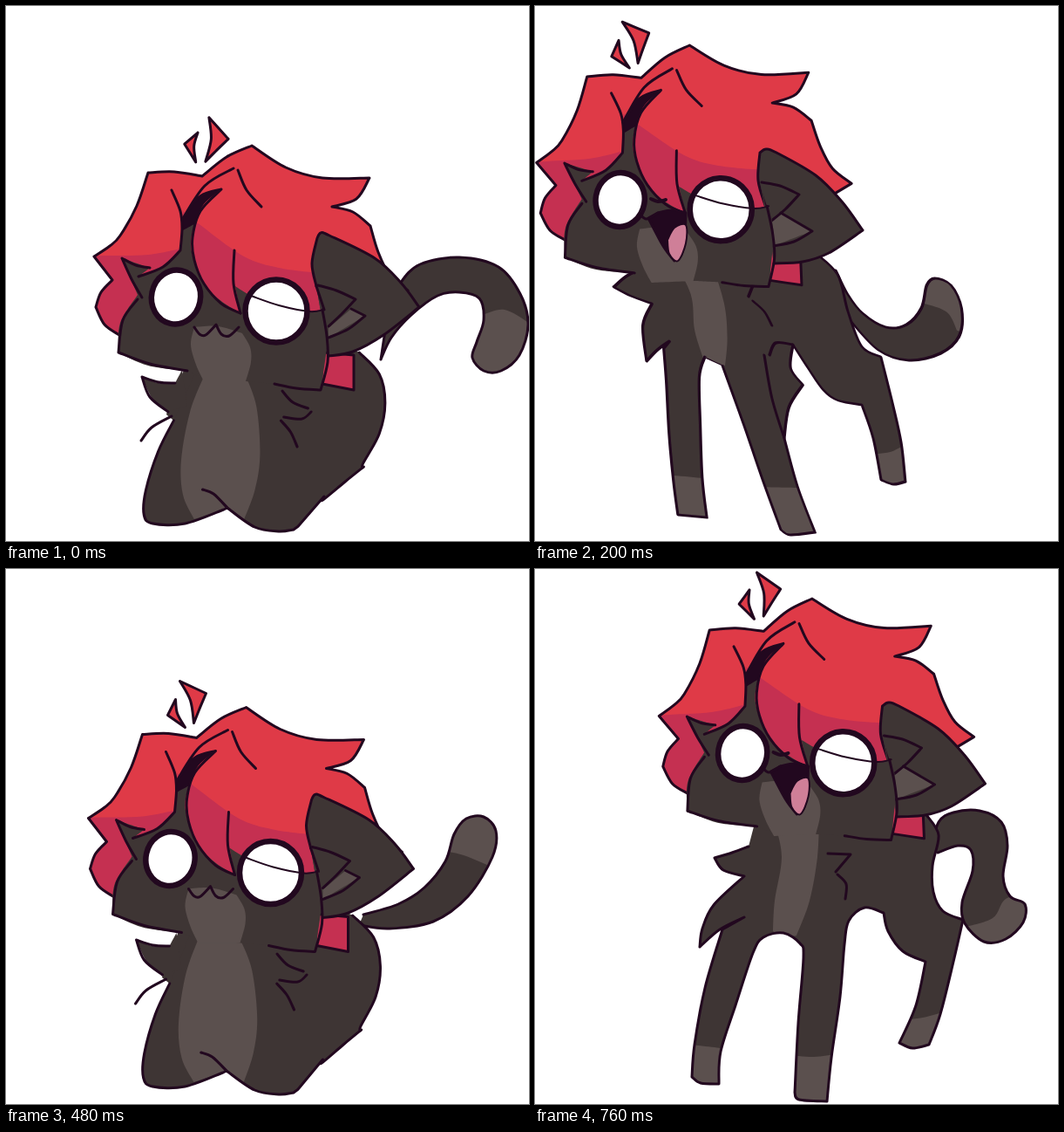
Write an HTML page that moves like this. It is 600 px wide and 613 px high and loops after 0.84 s.

```html
<!DOCTYPE html>
<html lang="en">
<head>
<meta charset="utf-8">
<title>Bouncing cat</title>
<style>
  html, body { margin: 0; width: 100%; height: 100%; overflow: hidden; background: #fff; }
  #strip { display: block; width: 6000px; height: 613px; animation: poses 840ms step-end infinite; }
  #strip path, #strip ellipse { stroke-linecap: round; stroke-linejoin: round; }
  @keyframes poses {
    0%     { transform: translateX(0); }
    9.52%  { transform: translateX(-600px); }
    19.04% { transform: translateX(-1200px); }
    23.8%  { transform: translateX(-1800px); }
    38.09% { transform: translateX(-2400px); }
    47.61% { transform: translateX(-3000px); }
    57.14% { transform: translateX(-3600px); }
    66.66% { transform: translateX(-4200px); }
    76.19% { transform: translateX(-4800px); }
    90.47% { transform: translateX(-5400px); }
    100%   { transform: translateX(-5400px); }
  }
</style>
</head>
<body>
<svg id="strip" viewBox="0 0 6000 613"></svg>
<script>
const INK = '#22081f', FUR = '#3e3534', PALE = '#5b504e',
      RED = '#df3a47', WINE = '#c53051', PINK = '#cf7f98';

// Smooth curve through points; "|" marks a corner.
function curve(text) {
  let d = '', last;
  for (const run of text.split('|')) {
    const n = run.trim().split(/\s+/).map(Number), p = last ? [last] : [];
    for (let i = 0; i < n.length; i += 2) p.push([n[i], n[i + 1]]);
    if (!last) d = `M${p[0]}`;
    for (let i = 0; i < p.length - 1; i++) {
      const a = p[i - 1] || p[i], b = p[i], c = p[i + 1], e = p[i + 2] || c;
      const h = k => [b[k] + (c[k] - a[k]) / 6, c[k] - (e[k] - b[k]) / 6];
      const [x1, x2] = h(0), [y1, y2] = h(1);
      d += `C${[x1, y1, x2, y2, ...c].map(v => +v.toFixed(1))}`;
    }
    last = p[p.length - 1];
  }
  return d;
}

const line = (pts, w = 3) =>
  `<path d="${curve(pts)}" fill="none" stroke="${INK}" stroke-width="${w}"/>`;
const fill = (pts, color) => `<path d="${curve(pts)}Z" fill="${color}"/>`;
const shape = (pts, color, w = 3) => fill(pts, color) + line(pts, w);
const group = (transform, inner) => `<g transform="${transform}">${inner}</g>`;
const use = id => `<use href="#${id}"/>`;

let clips = 0;
// Filled outline with shading kept inside it; "close" is the unstroked rest.
function shaded(pts, close, color, shades, shadeColor) {
  const id = 'c' + clips++;
  return `<clipPath id="${id}"><path d="${curve(pts + close)}Z"/></clipPath>` +
    fill(pts + close, color) +
    `<g clip-path="url(#${id})">${shades.map(s => fill(s, shadeColor)).join('')}</g>` + line(pts);
}

// Head parts
const hair = shaded(
  '117 374 100 362 90 342 | 96 325 109 311 | 88 284 | 106 272 118 260 137 226 150 188 | 180 187 212 192 |' +
  '240 170 269 157 | 308 182 350 194 404 194 | 389 218 361 227 | 385 233 405 249 | 414 279 427 305 448 323 |' +
  '424 336 | 352 345 | 300 420 | 117 374', '', RED,
  ['70 284 100 283 150 282 192 274 | 192 400 | 70 400', '190 232 210 248 260 284 300 297 346 303 | 360 380 | 190 380'], WINE)
  + shape('352 394 386 397 | 386 437 | 350 430', WINE);

const eye = (x, y, rx, ry, turn, w) =>
  `<ellipse cx="${x}" cy="${y}" rx="${rx}" ry="${ry}" transform="rotate(${turn} ${x} ${y})" fill="#fff" stroke="${INK}" stroke-width="${w}"/>`;

const face =
  fill('120 286 | 152 297 | 139 307 | 167 296 187 277 | 189 245 | 204 244 | 199 272 210 308 230 332 256 349 | 250 318 |' +
    '270 330 300 340 335 347 | 352 345 | 356 378 348 437 | 295 430 | 262 427 | 205 420 | 195 415 | 150 409 116 394 |' +
    '118 360 138 328', FUR)
  + fill('203 365 199 385 205 408 214 427 | 262 427 | 268 405 267 388 258 372 | 230 364 203 365', PALE)
  + fill('189 242 | 210 215 234 207 | 214 224 203 247 | 190 254', INK)
  + line('143 331 131 310 120 286 | 136 294 152 297')
  + line('138 333 121 357 116 394 | 152 407 195 415')
  + line('177 208 187 232 189 252 187 277 | 167 296 139 307')
  + line('295 430 320 435 348 437 | 356 405 355 375 350 345')
  + line('248 183 215 203 189 242 | 210 215 234 207 | 210 232 201 262 203 288 214 315 234 338 256 349')
  + line('249 277 248 315 256 349')
  + line('253 185 263 208 280 227')
  + eye(182, 330.5, 28, 31, 12, 6.5)
  + eye(297, 346.5, 35.5, 36, 0, 6.5)
  + line('268 329 300 340 335 347 352 345', 2);

const shards = shape('193 127 223 141 | 215 160 209 175 | 205 149 193 127', RED)
  + shape('188 148 190 164 199 180 | 179 166 | 188 148', RED);

const earLow =
  shape('343 318 338 292 344 263 | 348 257 358 260 410 286 440 314 461 342 | 420 374 385 393 357 398', FUR)
  + fill('352 345 | 343 318 | 357 398', FUR)
  + fill('383 344 | 399 352 | 357 377 | 357 366', PALE)
  + line('343 318 352 345')
  + line('345 317 366 323 388 333 | 372 350 357 364')
  + line('383 344 399 352 | 380 367 357 377');

const earHigh =
  shape('268 231 259 200 261 168 | 268 164 280 168 325 194 355 224 379 257 | 340 283 310 293 277 295', FUR)
  + fill('268 231 | 261 200 | 277 295', FUR)
  + fill('285 237 | 321 258 | 276 275 | 274 248', PALE)
  + line('263 202 284 206 306 216 | 290 233 273 247')
  + line('285 237 321 258 | 300 270 276 275');

const lips = line('203 365 209 373 216 374 228 362 | 234 373 243 375 254 365');
const smile = shape('212 372 215 385 222 394 232 397 243 393 248 374 | 236 374 228 364 | 220 373 212 372', PINK) + lips;
const shout =
  shape('133 243 144 237 | 160 234 176 237 | 175 262 171 285 163 292 | 150 275 133 243', INK)
  + shape('155 268 163 254 176 251 176 272 167 292 157 284 155 268', PINK, 2)
  + line('123 238 131 244 144 237')
  + line('136 221 144 224 153 222', 4);

// Tails: outline and the pale end
const tail = (pts, tip) => shaded(pts, '', FUR, [tip], PALE);
const tails = {
  farDown: tail('430 405 | 440 345 452 318 475 296 520 288 565 299 590 330 599 365 589 400 568 418 548 418 535 403 540 385 548 360 543 335 520 328 495 332 465 354 442 380 430 405',
    '525 362 546 354 572 348 600 363 | 600 430 | 520 430'),
  nearDown: tail('420 412 | 435 345 455 315 490 302 530 310 555 336 562 368 553 400 537 424 517 430 497 415 500 394 512 376 508 358 490 353 465 362 440 386 424 412',
    '490 375 512 365 535 358 565 360 | 565 440 | 485 440'),
  nearUp: tail('400 418 413 412 452 388 477 350 488 300 478 250 462 223 440 214 423 226 424 248 437 275 440 300 430 340 400 380',
    '410 280 438 287 462 290 490 284 | 490 200 | 410 200'),
  farUp: tail('405 405 430 412 470 410 505 386 524 343 528 295 519 250 500 223 476 214 455 228 452 250 467 272 483 295 483 328 470 362 450 385 410 394',
    '440 285 467 278 494 273 530 275 | 530 200 | 440 200'),
  mid: tail('405 408 440 412 490 404 530 375 558 330 562 300 548 284 528 286 514 304 504 335 480 365 450 384 410 396',
    '495 322 525 328 565 345 | 580 270 | 495 270'),
};

// Sitting
const sitBody =
  fill('183 475 | 174 468 | 192 412 | 215 370 | 340 370 | 390 397 | 420 470 | 250 570 | 170 570', FUR)
  + shaded('183 475 168 510 157 555 157 583 168 593 205 593 248 577 | 252 575 | 285 597 313 602 330 600 | 335 596 | 362 562 | 361 566 385 545 405 528 |' +
    '404 524 420 490 424 455 415 422 390 397', '| 215 390', FUR,
    ['214 424 201 465 195 520 200 560 215 588 | 248 577 | 256 580 271 592 | 282 555 285 515 277 460 262 424'], PALE)
  + line('222 554 235 559 252 575')
  + line('305 441 318 454 336 461') + line('340 465 330 473 309 471') + line('306 475 318 488 327 505');

const ruffLeft = fill('145 440 155 458 175 469 | 195 460 | 187 415 | 180 434 | 160 440 145 440', FUR)
  + line('180 434 163 440 145 440 | 155 458 175 469') + line('148 512 160 492 183 474');
const ruffRight = fill('156 425 168 450 186 465 | 208 458 | 202 417 | 194 432 | 175 432 156 425', FUR)
  + line('194 432 175 431 156 425 | 165 448 186 465') + line('155 498 167 483 190 470');

function sit({ lean, mouth, tail, tilt }) {
  const ruff = lean === 0 ? ruffLeft : group(`translate(${13 * (lean - 1)} 0)`, ruffRight);
  return tails[tail]
    + group(`matrix(1 0 ${-.075 * lean} 1 ${45 * lean} 0)`, sitBody) + ruff
    + group(`translate(${13 * lean} ${3 * lean})`,
      use('hair') + earLow + use('face') + mouth + group(`rotate(${tilt} 212 192)`, use('shards')));
}

// Standing
const stretch = tail('470 303 472 330 480 352 500 368 525 365 550 346 567 320 580 312 595 320 596 346 580 378 550 398 510 406 480 394 462 360',
    '540 338 562 343 578 352 580 372 | 620 380 | 620 290 | 550 290')
  + shaded('245 302 226 310 207 322 | 222 332 243 341 | 222 366 209 407 | 227 394 245 384 | 235 392 | 222 430 200 490 182 545 171 583 | 203 586 |' +
    '217 540 240 480 262 425 278 402 | 294 411 | 290 480 285 545 282 600 | 290 606 320 603 | 322 550 330 495 | 350 460 377 434 | 371 415 385 388 |' +
    '391 415 398 440 410 452 435 457 | 432 495 421 543 | 433 548 448 545 | 462 500 471 455 480 402 | 463 390 464 350 470 308 455 283',
    '| 380 230 | 265 270', FUR,
    ['160 537 185 538 217 541 | 210 600 | 160 600', '270 551 322 552 | 330 620 | 270 620', '415 514 445 511 470 500 | 470 560 | 410 560',
     '288 285 292 330 279 372 275 409 | 297 412 | 313 380 326 340 332 285'], PALE)
  + fill('278 402 | 294 411 | 297 411 | 297 400', PALE)
  + line('330 495 335 450 347 400') + line('353 400 366 386 385 388')
  + line('351 311 375 311 | 357 333') + line('360 338 368 350 370 366');

const landRight = tail('455 320 463 290 480 279 510 277 535 290 542 317 537 352 545 375 562 384 560 405 540 424 515 427 493 406 490 382 502 346 500 322 485 317 462 325',
    '570 370 540 378 525 400 490 411 | 490 440 | 580 440')
  + shaded('245 318 226 325 206 331 | 216 345 240 352 | 205 385 192 412 189 433 | 212 413 240 399 | 215 413 | 195 480 183 545 180 582 | 190 589 211 590 |' +
    '213 553 230 500 250 440 262 422 285 417 304 429 308 445 302 520 298 600 | 303 608 335 610 | 340 560 350 490 355 430 360 403 378 388 400 394 |' +
    '405 415 422 438 448 450 | 437 500 418 543 | 433 549 452 545 | 465 510 480 450 491 402 | 468 392 457 370 456 340 463 305 450 283',
    '| 370 240 | 255 280', FUR,
    ['170 544 213 549 | 215 600 | 170 600', '290 557 320 559 345 556 | 345 620 | 290 620', '415 517 445 514 470 507 | 470 560 | 410 560',
     '275 290 283 330 275 380 273 415 | 285 422 300 420 | 315 380 324 330 326 285'], PALE)
  + line('336 326 362 327 | 345 347') + line('347 350 357 361 356 378');

const landLeft = tail('350 315 360 293 380 281 408 277 435 295 447 322 452 352 466 377 482 381 492 398 483 420 460 427 435 412 420 385 414 350 409 325 393 316 370 323',
    '500 370 465 380 458 400 430 413 | 430 440 | 500 440')
  + shaded('140 320 125 326 107 332 | 118 347 146 354 | 150 358 | 130 385 127 410 132 434 | 150 412 171 398 | 153 412 | 155 480 160 545 172 585 | 203 591 |' +
    '196 550 196 490 199 425 | 210 417 228 417 252 437 268 490 285 560 297 605 | 333 610 | 328 560 312 490 300 430 296 402 308 388 330 390 |' +
    '345 415 366 438 400 448 | 404 500 405 545 | 440 548 | 442 510 437 450 428 402 | 402 395 380 372 370 338 360 302 342 283',
    '| 240 240 | 125 290', FUR,
    ['150 541 180 545 200 550 | 210 600 | 150 600', '275 558 305 560 335 556 | 345 620 | 275 620', '400 516 425 514 445 507 | 445 555 | 400 555',
     '144 295 160 325 185 365 202 417 | 222 422 232 410 | 231 380 215 350 190 325 180 300'], PALE)
  + line('243 325 270 327 | 258 346') + line('262 351 276 361 280 378');

const stand = (body, x, y, tilt) => body + group(`translate(${x} ${y})`,
  group('translate(-95 -100.6) rotate(-2.4)', use('hair')) + earHigh
  + group('translate(-95 -100.6) rotate(-2.4)', use('face') + group(`rotate(${tilt} 212 192)`, use('shards')))
  + shout);

const poses = [
  sit({ lean: 1, mouth: lips, tail: 'farDown', tilt: 23 }),
  sit({ lean: .5, mouth: lips, tail: 'mid', tilt: 12 }),
  sit({ lean: 0, mouth: smile, tail: 'nearUp', tilt: 0 }),
  stand(group('matrix(1 0 .42 1 -252 0)', stretch), -3, 0, 0),
  stand(landLeft, 0, 0, 12),
  sit({ lean: 0, mouth: lips, tail: 'nearDown', tilt: 0 }),
  sit({ lean: .5, mouth: lips, tail: 'mid', tilt: 0 }),
  sit({ lean: 1, mouth: smile, tail: 'farUp', tilt: -11 }),
  stand(stretch, 146, -17.5, 0),
  stand(landRight, 137.5, -11, 12),
];

document.getElementById('strip').innerHTML =
  `<defs><g id="hair">${hair}</g><g id="face">${face}</g><g id="shards">${shards}</g></defs>` +
  poses.map((p, i) => `<svg x="${600 * i}" width="600" height="613">${p}</svg>`).join('');
</script>
</body>
</html>
```
